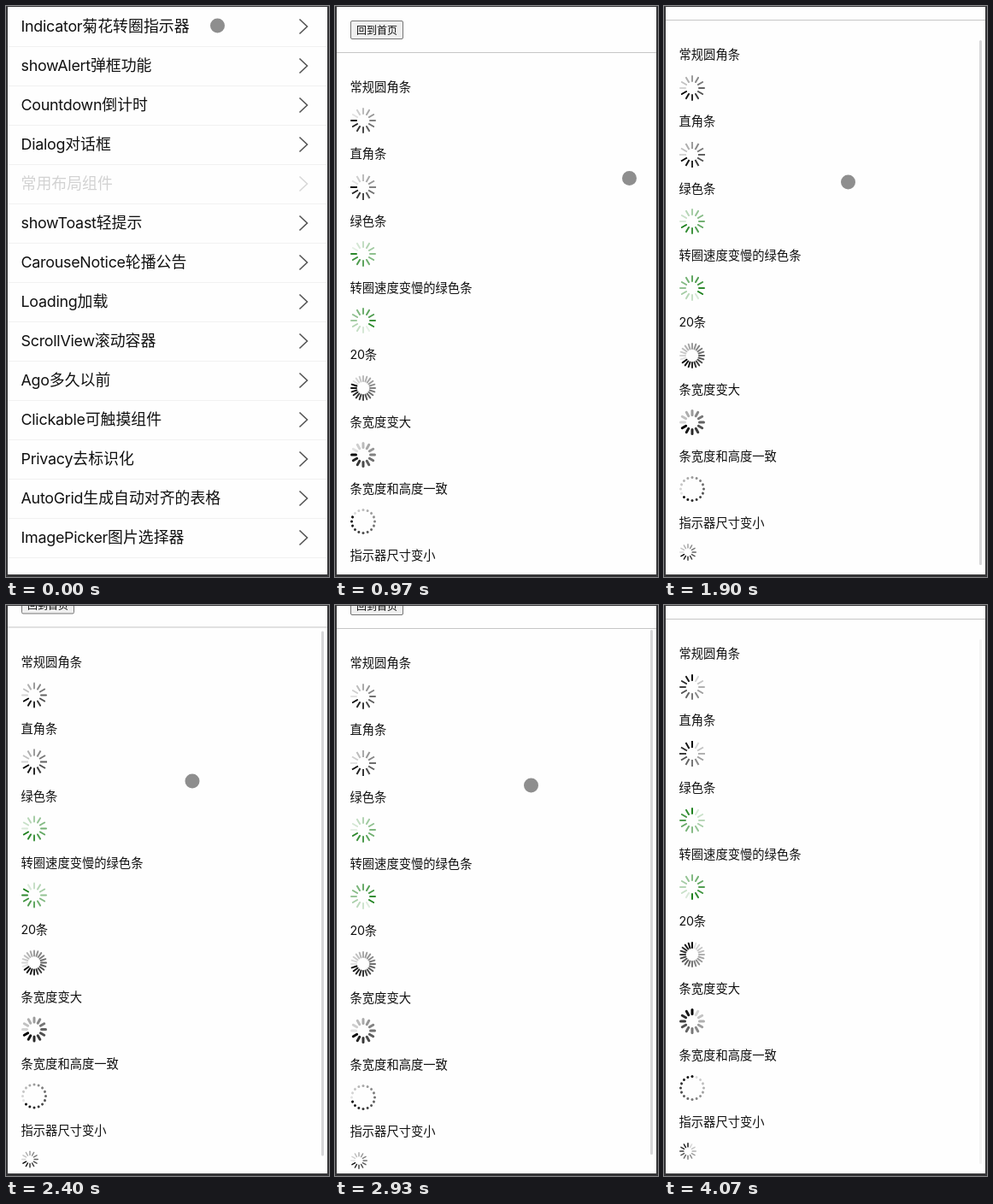
These frames come from a looping animation (378 by 668 pixels, 4110 ms). An HTML page:

```html
<!DOCTYPE html>
<html lang="zh-CN">
<head>
<meta charset="utf-8">
<title>Indicator</title>
<style>
  html, body { margin: 0; width: 100%; height: 100%; overflow: hidden; background: #fff; }
  body { font-family: "Noto Sans CJK SC", "Noto Sans CJK", sans-serif; color: #111; }
  #stage { position: relative; width: 378px; height: 668px; overflow: hidden; background: #fefefe; }
  #stage div, #stage svg { position: absolute; }
  #list, #page { left: 0; top: 0; width: 378px; height: 668px; }
  #frame {
    inset: 0; box-sizing: border-box;
    border: solid #353537; border-width: 1px 2px 3px;
  }
  .row {
    left: 2px; width: 374px; height: 46px; box-sizing: border-box;
    padding-left: 15.5px; border-bottom: 1px solid #f1f1f1;
    font-size: 17.9px; line-height: 41px; white-space: nowrap;
  }
  span { font-family: Inter, sans-serif; letter-spacing: -.015em; }
  .row svg { left: 340px; top: 12px; fill: none; stroke: #555; stroke-width: 1.6; }
  .row.off { color: #d2d2d2; }
  .row.off svg { stroke: #d8d8d8; }
  .label { left: 17.5px; height: 24px; font-size: 14.3px; line-height: 22.4px; white-space: nowrap; }
  .spin { left: 18px; overflow: visible; }
  #home {
    left: 18px; top: 17px; width: 62px; height: 22px; box-sizing: border-box;
    border: 1px solid #767676; border-radius: 2px; background: #efefef;
    font-size: 12px; line-height: 19px; text-align: center; white-space: nowrap;
  }
  #rule { left: 0; top: 54px; width: 378px; height: 1px; background: #c6c6c6; }
  #thumb { left: 369px; top: 2px; width: 3px; height: 614px; border-radius: 1.5px; background: #d6d6d8; }
  #cursor { left: -8.5px; top: -8.5px; width: 17px; height: 17px; border-radius: 50%; background: #8e8e8e; }
</style>
</head>
<body>
<div id="stage">
  <div id="list"></div>
  <div id="page">
    <div id="home">回到首页</div>
    <div id="rule"></div>
  </div>
  <div id="thumb"></div>
  <div id="frame"></div>
  <div id="cursor"></div>
</div>
<script>
const LOOP = 4110, OPEN = 600, SPIN_START = 561, PITCH = 78.3;
const $ = id => document.getElementById(id);
const markLatin = text => text.replace(/^[A-Za-z0-9]+/, '<span>$&</span>');

const items = [
  'Indicator菊花转圈指示器', 'showAlert弹框功能', 'Countdown倒计时', 'Dialog对话框',
  '常用布局组件', 'showToast轻提示', 'CarouseNotice轮播公告', 'Loading加载',
  'ScrollView滚动容器', 'Ago多久以前', 'Clickable可触摸组件', 'Privacy去标识化',
  'AutoGrid生成自动对齐的表格', 'ImagePicker图片选择器'
];
$('list').innerHTML = items.map((text, i) => `
  <div class="row${i === 4 ? ' off' : ''}" style="top:${2 + 46 * i}px">
    ${markLatin(text)}
    <svg width="14" height="20"><path d="M1.5 1.5 10.5 10 1.5 18.5"/></svg>
  </div>`).join('');

const GREEN = '#1c801c';
const base = { size: 30, bars: 12, width: 2, length: 8, round: 1, color: '#000', period: 500 };
const spinners = [
  ['常规圆角条', {}],
  ['直角条', { round: 0 }],
  ['绿色条', { color: GREEN }],
  ['转圈速度变慢的绿色条', { color: GREEN, period: 1000 }],
  ['20条', { bars: 20 }],
  ['条宽度变大', { width: 3, round: 1.5 }],
  ['条宽度和高度一致', { bars: 16, width: 3, length: 3, round: 1.5 }],
  ['指示器尺寸变小', { size: 20, width: 1.4, length: 5.6, round: .7 }]
].map(([label, options], i) => {
  const s = { ...base, ...options }, c = s.size / 2;
  const bars = Array.from({ length: s.bars }, (_, k) =>
    `<rect x="${c - s.width / 2}" width="${s.width}" height="${s.length}" rx="${s.round}"
      fill="${s.color}" transform="rotate(${360 / s.bars * k} ${c} ${c})"/>`).join('');
  $('page').insertAdjacentHTML('beforeend', `
    <div class="label" style="top:${83 + PITCH * i}px">${markLatin(label)}</div>
    <svg class="spin" style="top:${118.5 + PITCH * i}px" width="${s.size}" height="${s.size}">${bars}</svg>`);
  s.rects = [...$('page').lastElementChild.children];
  return s;
});

// Each point is [time, value], eased between neighbours.
function track(points, t) {
  const next = points.findIndex(p => p[0] > t);
  if (next === 0) return points[0][1];
  if (next < 0) return points[points.length - 1][1];
  const [t0, a] = points[next - 1], [t1, b] = points[next];
  const u = (t - t0) / (t1 - t0);
  return a + (b - a) * u * u * (3 - 2 * u);
}

const cursorX = [[20, 247], [230, 96], [600, 96], [930, 344], [1150, 344], [1600, 215],
  [1950, 215], [2400, 217.5], [2600, 218], [2930, 229], [3200, 247.5]];
const cursorY = [[20, 22.5], [230, 24], [600, 24], [930, 201], [1150, 201], [1600, 205.5],
  [2400, 205.5], [2930, 210.5], [3200, 196.5]];
const scroll = [[1660, 0], [1860, 38], [2210, 38], [2400, 28.5], [2600, 27], [2935, 27], [3200, 38]];
const thumbFade = [[1660, 0], [1700, 1], [3270, 1], [3520, .3]];

function draw(now) {
  const t = now % LOOP, open = t >= OPEN, y = track(scroll, t);
  $('list').style.display = open ? 'none' : '';
  $('page').style.display = open ? '' : 'none';
  $('page').style.transform = `translateY(${-y}px)`;
  $('thumb').style.transform = `translateY(${y}px)`;
  $('thumb').style.opacity = track(thumbFade, t);
  $('cursor').style.transform = `translate(${track(cursorX, t)}px, ${track(cursorY, t)}px)`;
  $('cursor').style.display = t < 3300 ? '' : 'none';
  if (open) for (const s of spinners) {
    const turn = (t - SPIN_START) / s.period;
    s.rects.forEach((bar, k) => {
      const age = (turn - k / s.bars + 1) % 1;
      bar.style.opacity = 1 - .9 * age;
    });
  }
}

const start = performance.now();
function tick() {
  draw(performance.now() - start);
  requestAnimationFrame(tick);
}
tick();
</script>
</body>
</html>
```
